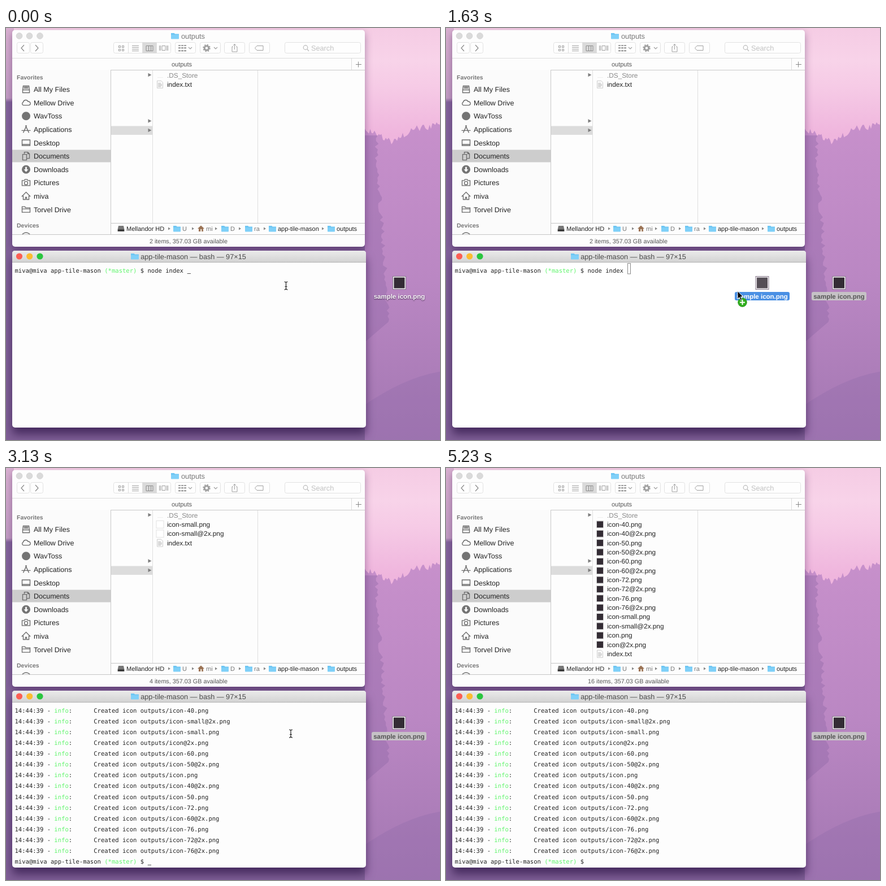
Write an HTML page that moves like this. It is 768 px wide and 729 px high and loops after 5.6 s.

```html
<!DOCTYPE html>
<html lang="en">
<head>
<meta charset="utf-8">
<title>Icon export</title>
<style>
html, body { margin: 0; width: 100%; height: 100%; overflow: hidden; }
svg { display: block; width: 768px; height: 729px; }
text { white-space: pre; text-rendering: geometricPrecision; font-family: "Liberation Sans", Arial, sans-serif; }
.mono { font-family: "DejaVu Sans Mono", monospace; font-size: 10.56px; }
.finder { filter: drop-shadow(0 5px 7px rgba(50, 15, 70, .4)); }
.terminal { filter: drop-shadow(0 12px 8px rgba(35, 10, 60, .6)); }
.icon { fill: none; stroke: #6c6c6c; stroke-width: 1.4; }
.light { text-shadow: 0 1px 2px rgba(30, 0, 40, .8); }
</style>
</head>
<body>
<svg id="stage" viewBox="0 0 768 729">
  <defs>
    <linearGradient id="sky" x1="0" y1="0" x2="0" y2="1">
      <stop offset="0" stop-color="#f5cce4"/><stop offset=".08" stop-color="#f8d3e9"/>
      <stop offset=".14" stop-color="#f6cbe6"/><stop offset=".26" stop-color="#efb5dd"/>
    </linearGradient>
    <linearGradient id="wood" x1="0" y1="0" x2="0" y2="1">
      <stop offset="0" stop-color="#c790cb"/><stop offset=".5" stop-color="#ba87c3"/><stop offset="1" stop-color="#a377b2"/>
    </linearGradient>
    <linearGradient id="edge" x1="0" y1="0" x2="0" y2="1">
      <stop offset="0" stop-color="#d9b0d1"/><stop offset=".17" stop-color="#c39cc4"/>
      <stop offset=".18" stop-color="#83649b"/><stop offset="1" stop-color="#7f5f96"/>
    </linearGradient>
    <linearGradient id="bar" x1="0" y1="0" x2="0" y2="1">
      <stop offset="0" stop-color="#ebebeb"/><stop offset="1" stop-color="#d3d3d3"/>
    </linearGradient>
    <clipPath id="sidebar"><path d="M11 74H185V365H11Z"/></clipPath>
  </defs>
  <g id="fixed"></g>
  <g id="live"></g>
</svg>
<script>
const LOOP = 5600, COL = 6.357, LEFT = 15.5;
const USER = 'miva', PROJECT = 'app-tile-mason';
const fixed = document.getElementById('fixed'), live = document.getElementById('live');

const rect = (x, y, w, h, fill, extra = '') =>
  `<rect x="${x}" y="${y}" width="${w}" height="${h}" fill="${fill}" ${extra}/>`;
const circle = (x, y, r, fill, extra = '') => `<circle cx="${x}" cy="${y}" r="${r}" fill="${fill}" ${extra}/>`;
const path = (d, fill = 'none', stroke = 'none', extra = '') =>
  `<path d="${d}" fill="${fill}" stroke="${stroke}" ${extra}/>`;
const text = (x, y, size, str, fill = '#222', extra = '') =>
  `<text x="${x}" y="${y}" font-size="${size}" fill="${fill}" ${extra}>${str}</text>`;
const mono = (x, y, str) => `<text class="mono" x="${x}" y="${y}" fill="#222">${str}</text>`;
const green = str => `<tspan fill="#5ff56b">${str}</tspan>`;
const move = (x, y, body) => `<g transform="translate(${x} ${y})">${body}</g>`;
const middle = 'text-anchor="middle"';
const folder = (x, y, w = 13) =>
  path(`M${x} ${y + 10}V${y}h${w * .4}l1.5 1.5H${x + w}V${y + 10}Z`, '#6ec6f3') +
  rect(x, y + 3, w, 7.5, '#7fd0f8', 'rx=".8"');

// ---- fixed scenery ----
function wallpaper() {
  const noise = n => Math.abs(Math.sin(n * 91.7) * 437.5) % 1;
  let ridge = 'M630 729V180', grove = 'M630 190';
  for (let x = 632; x <= 770; x += 2.5)
    ridge += `L${x} ${174 + 20 * Math.exp(-(((x - 682) / 24) ** 2)) - Math.max(0, x - 710) / 7 + 12 * noise(x)}`;
  for (let y = 190; y <= 520; y += 5)
    grove += `L${650 + 22 * ((y - 190) / 330) + 9 * noise(y)} ${y}`;
  return rect(0, 0, 768, 729, 'url(#sky)') +
    path(ridge + 'V729Z', 'url(#wood)') +
    path(grove + 'L630 560Z', '#8f68a6', 'none', 'opacity=".4"') +
    path('M768 608Q705 618 630 670V729H768Z', '#8f6aa8', 'none', 'opacity=".35"') +
    rect(0, 0, 14, 729, 'url(#edge)') + rect(11, 300, 624, 429, '#7f5f96');
}

const places = [
  ['All My Files', 'M-6 1L-5-6H5L6 1V6H-6ZM-6 1H6M-4-2H4M-4-4H4'],
  ['Mellow Drive', 'M-5 4.5A3 3 0 0 1-5-1A4.5 4.5 0 0 1 3.5-2A3.2 3.2 0 0 1 5 4.5Z'],
  ['WavToss', ''],
  ['Applications', 'M-5 6L1-7M5 6L-1-7M-8 2H8'],
  ['Desktop', 'M-7-5H7V5H-7ZM-7 3H7'],
  ['Documents', 'M-6-3H1V7H-6ZM-3-4V-7H3L6-4V4H1M3-7V-4H6'],
  ['Downloads', ''],
  ['Pictures', 'M-7-4H-3L-2-6H2L3-4H7V5H-7ZM-3 .5a3 3 0 0 0 6 0a3 3 0 0 0-6 0'],
  [USER, 'M0-7L7 0H5V6H1V2H-1V6H-5V0H-7Z'],
  ['Torvel Drive', 'M-7 5V-5H-2L-1-3H7V5ZM-7-1H7']
];

function sidebar() {
  const rows = places.map(([name, d], i) => {
    const y = 108.5 + 23.63 * i;
    let icon = d ? path(d, 'none', '#6c6c6c', 'class="icon"') : circle(0, 0, 7.5, '#747474');
    if (name === 'Downloads') icon += path('M-1.3-4.5H1.3V0H4L0 4.5-4 0H-1.3Z', '#fff');
    return move(35.5, y, icon) + text(49, y + 4.5, 12.5, name);
  });
  return rect(11, 74, 174, 291, '#fbfbfb') + rect(11, 215.5, 174, 22, '#cdcdcd') +
    text(19, 91, 10.5, 'Favorites', '#777', 'font-weight="bold"') + rows.join('') +
    text(19, 353, 10.5, 'Devices', '#777', 'font-weight="bold"') +
    `<g clip-path="url(#sidebar)">${circle(35.5, 370, 8, 'none', 'class="icon"')}</g>`;
}

function toolbar() {
  const ink = '#a0a0a0';
  const button = (x, w) => rect(x + .5, 25.5, w, 19, '#fefefe', 'stroke="#e2e2e2" rx="3"');
  const chevron = (x, s) => path(`M${x + 2 * s} 30l${-5 * s} 5.5l${5 * s} 5.5`, 'none', '#888', 'stroke-width="1.2"');
  const drop = x => path(`M${x} 34l3 3l3-3`, 'none', ink, 'stroke-width="1.2"');
  let s = [23.5, 41.5, 60].map(x => circle(x, 14, 5.4, '#dadada', 'stroke="#cecece" stroke-width=".7"')).join('');
  s += folder(292, 9, 14) + text(331, 18.5, 12.8, 'outputs', '#777', middle);
  s += button(19, 22) + button(43, 22) + chevron(30, 1) + chevron(54, -1);
  s += button(190, 101) + rect(241, 25.5, 25, 19, '#dadada') + path('M216.5 26V44M241.5 26V44M266.5 26V44', 'none', '#dfdfdf');
  for (const x of [199.5, 205.5]) for (const y of [31.5, 37.5]) s += rect(x, y, 3, 3, 'none', `stroke="${ink}"`);
  s += path('M223 31.5H235M223 34.5H235M223 37.5H235M223 40.5H235', 'none', ink);
  s += path('M248 31.5H260V40.5H248ZM252.5 31V40M256.5 31V40', 'none', '#8c8c8c');
  s += path('M271.5 31V40M273.5 31V40M276 31.5H282V39.5H276ZM284.5 31V40M286.5 31V40', 'none', ink);
  s += button(299, 36) + button(343, 36) + button(386, 36) + button(430, 36) + button(493, 134);
  for (const x of [305, 310, 315]) s += rect(x, 30, 4, 2, ink) + rect(x, 34, 4, 2.5, ink) + rect(x, 39, 4, 2.5, ink);
  s += drop(323) + drop(368);
  s += circle(355, 35.5, 3.8, 'none', `stroke="${ink}" stroke-width="3"`) +
    circle(355, 35.5, 5.8, 'none', `stroke="${ink}" stroke-width="2" stroke-dasharray="2.3 2.25"`);
  s += path('M402 33H400V42H409V33H407M404.5 38V28.5M402 31L404.5 28.5L407 31', 'none', ink);
  s += path('M440.5 35.5L444 31.5H455V39.5H444Z', 'none', ink);
  s += circle(530, 34.5, 3.8, 'none', 'stroke="#bbb" stroke-width="1.2"') + path('M533 37.5L536 41', 'none', '#bbb', 'stroke-width="1.2"');
  s += text(540, 40, 12.7, 'Search', '#c2c2c2');
  s += path('M11 53.5H635M611.5 54V74', 'none', '#dcdcdc') + path('M11 74.5H635', 'none', '#c9c9c9');
  return s + text(311, 67.5, 11, 'outputs', '#555', middle) + path('M619 64.5H629M623.5 59.5V69.5', 'none', '#888');
}

function pathBar() {
  const label = (x, str, fill = '#222') => text(x, 359, 11, str, fill);
  const arrows = [287, 329, 370, 412, 456, 559].map(x => path(`M${x} 352.5l4 2.5l-4 2.5Z`, '#888')).join('');
  const folders = [296, 381, 423, 465, 569].map(x => folder(x, 350)).join('');
  return arrows + folders + path('M199 350H208L209.5 357V360H197.5V357Z', '#777') + rect(198, 356.5, 11, 3, '#333') +
    path('M345 349.5L351 355H349V360H341V355H339Z', '#9b7355') + rect(344, 356, 2.5, 4, '#e9ddd0') +
    label(213, 'Mellandor HD') + label(312, 'U', '#777') + label(354, USER.slice(0, 2), '#777') +
    label(397, 'D', '#777') + label(439, 'ra', '#777') + label(481, PROJECT) + label(585, 'outputs');
}

function finder() {
  return `<g class="finder">${rect(11, 3.5, 624, 383.5, '#fdfdfd', 'rx="5"')}</g>` + toolbar() + sidebar() +
    rect(186, 173.5, 73, 15.5, '#dcdcdc') +
    path('M185.5 74V365', 'none', '#cacaca') + path('M259.5 75V345M445.5 75V345', 'none', '#e0e0e0') +
    [83, 164.5, 181].map(y => path(`M251.5 ${y - 3.2}l6 3.2l-6 3.2Z`, '#7d7d7d')).join('') +
    path('M186 345.5H635M11 365.5H635', 'none', '#c6c6c6') + pathBar();
}

fixed.innerHTML = wallpaper() + finder() +
  `<g class="terminal">${rect(11, 394, 626, 313, '#fdfdfd', 'rx="5"')}</g>`;

// ---- timeline: each entry holds until the next ----
const at = (t, track) => track.filter(k => k[0] <= t).pop().slice(1);

const pointerTrack = [
  [0, 'beam', 495.5, 456], [450, 'arrow', 601, 351], [590, 'arrow', 730, 368], [740, 'arrow', 732, 424],
  [890, 'arrow', 704, 456], [1040, 'arrow', 693, 459], [1190, 'arrow', 693.5, 456.5], [1340, 'arrow', 691, 466],
  [1490, 'arrow', 600, 459], [1630, 'arrow', 515.5, 465], [1780, 'arrow', 504, 470],
  [1930, 'beam', 504, 470], [4480, 'arrow', 703.5, 545.5], [4630, 'none']
];
const ghostTrack = [[0], [1490, 646.5, 451], [1630, 559.5, 451], [1780, 503.5, 455], [1930]];
const pair = name => [`icon-${name}.png`, `icon-${name}@2x.png`];
const allIcons = [...['40', '50', '60', '72', '76', 'small'].flatMap(pair), 'icon.png', 'icon@2x.png'];
const fileTrack = [[0, [], ''], [2980, pair('small'), 'blank'],
  [3430, ['icon-40.png', ...pair('small')], 'preview'], [4180, allIcons, 'thumb']];
const logOrder = ['-40', '-small@2x', '-small', '@2x', '-60', '-50@2x', '', '-40@2x', '-50', '-72', '-60@2x', '-76', '-72@2x', '-76@2x'];

function fileIcon(kind, y) {
  if (kind === 'thumb') return rect(266.5, y - 6, 12, 12, '#332c34', 'stroke="#d5d5d5"');
  if (kind === 'blank') return rect(266, y - 6.5, 13, 13, '#fff', 'stroke="#e2e2e2"');
  const page = path(`M267.5 ${y - 6.5}h7l3 3v10h-10Z`, '#fafafa', '#cfcfcf');
  return page + (kind === 'preview' ? rect(268.5, y - 1, 8, 4.5, '#596080', 'rx="1"')
    : path(`M269 ${y - 2}h5M269 ${y}h7M269 ${y + 2}h7M269 ${y + 4}h5`, 'none', '#aaa', 'stroke-width=".8"'));
}

function files(t) {
  const [icons, kind] = at(t, fileTrack);
  const rows = ['.DS_Store', ...icons, 'index.txt'].map((name, i) => {
    const y = 83.5 + 16.36 * i;
    const icon = i ? fileIcon(name === 'index.txt' ? 'text' : kind, y) : path('M268 87.5H278', 'none', '#eee');
    return icon + text(285, y + 4, 11.8, name, i ? '#222' : '#888');
  });
  return rows.join('') + text(323, 380.5, 10.8, `${icons.length + 2} items, 357.03 GB available`, '#555', middle);
}

function terminal(t) {
  const busy = t >= 2980 && t < 3130, dropping = t >= 1630 && t < 1930;
  const prompt = `${USER}@${USER} ${PROJECT} ${green('(*master)')} $ `;
  const caret = (col, y) => rect(LEFT + COL * col, y, 6.3, 1, '#555');
  let s = dropping ? rect(11, 415, 626, 288, '#fff') : '';
  s += path('M11 414V399Q11 394 16 394H632Q637 394 637 399V414Z', 'url(#bar)') + path('M11 414.5H637', 'none', '#b2b2b2');
  s += circle(23.5, 404, 5.6, '#fb5e53') + circle(41.7, 404, 5.6, '#fcbb30') + circle(60, 404, 5.6, '#2ac63f');
  if (busy) s += circle(23.5, 404, 1.7, '#700');
  s += folder(busy ? 214 : 221, 399, 14);
  s += text(331.5, 408.5, 12.7, `${PROJECT} — ${busy ? 'convert' : 'bash'} — 97×15`, '#4a4a4a', middle);
  if (t >= 3130) {
    logOrder.forEach((name, i) => {
      s += mono(LEFT, 433 + 19.07 * i, `14:44:39 - ${green('info')}:      Created icon outputs/icon${name}.png`);
    });
    s += mono(LEFT, 700, prompt);
    if (t < 4030 || (t >= 4780 && t < 4930)) s += caret(37, 702);
    return s;
  }
  s += mono(LEFT, 433, prompt + 'node index ' + (t >= 1930 ? `/Users/${USER}/Desktop/sample\\ icon.png` : ''));
  if (t < 1340) s += caret(48, 434);
  else if (t >= 1490 && t < 1930) s += rect(321.5, 416.5, 5, 18.5, 'none', 'stroke="#888"');
  else if (t >= 1930 && t < 2980) s += caret(85, 434);
  return s;
}

function desktopIcon(x, y, pill, color, ink = '#332c34') {
  return rect(x - 11.5, y - 11.5, 23, 23, '#f3f0f3', 'stroke="#86798a"') + rect(x - 9.5, y - 9.5, 19, 19, ink) +
    (pill ? rect(x - 48.5, y + 16, 97, 15, pill, 'rx="3"') : '') +
    text(x, y + 27.5, 11.5, 'sample icon.png', color, `${middle} font-weight="bold" ${pill ? '' : 'class="light"'}`);
}

function pointer(t) {
  const [kind, x, y] = at(t, pointerTrack);
  if (kind === 'none') return '';
  if (kind === 'beam')
    return move(x, y, path('M-3-7Q0-7 0-5V5Q0 7-3 7M3-7Q0-7 0-5M0 5Q0 7 3 7M-2 1.5H2', 'none', '#222', 'stroke-width="1.2"'));
  const badge = t >= 1490 && t < 1930
    ? circle(9, 20.5, 7.8, '#2fae1d', 'stroke="#1d8a12" stroke-width=".8"') + path('M4.5 20.5H13.5M9 16V25', 'none', '#fff', 'stroke-width="2"')
    : '';
  return move(x, y, badge + path('M.5.5V14.5L3.6 11.6 5.9 16.8 8.2 15.8 6 10.7H10.3Z', '#000', '#fff', 'stroke-width=".9"'));
}

function draw(t) {
  const [gx, gy] = at(t, ghostTrack);
  return files(t) + terminal(t) +
    (t < 1340 ? desktopIcon(696, 451, '', '#fff') : desktopIcon(695.5, 451, '#c6c2c6', '#555')) +
    (gx ? desktopIcon(gx, gy, '#4a90e4', '#fff', '#554e56') : '') + pointer(t);
}

let shown = '';
function frame() {
  const next = draw(performance.now() % LOOP);
  if (next !== shown) live.innerHTML = shown = next;
  requestAnimationFrame(frame);
}
frame();
</script>
</body>
</html>
```
